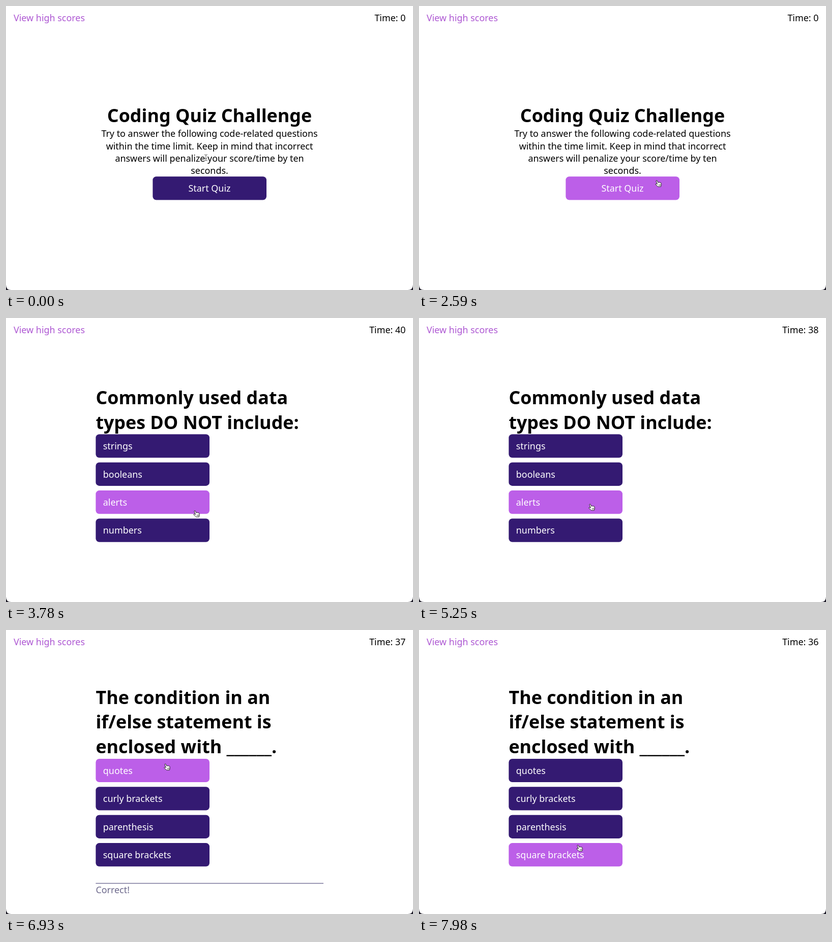
An HTML page for the animation above (8 s loop, 800 px wide and 560 px high).

```html
<!DOCTYPE html>
<html lang="en">
<head>
<meta charset="utf-8">
<title>Coding quiz</title>
<style>
html, body { margin: 0; width: 100%; height: 100%; overflow: hidden; background: #1c1a26; }
svg { display: block; width: 800px; height: 560px; }
text { font: 17.92px "Noto Sans", "Open Sans", sans-serif; white-space: pre; }
.title { font-size: 35.84px; font-weight: 700; }
.mid { text-anchor: middle; }
.end { text-anchor: end; }
.button rect { fill: #341a72; }
.button.hover rect { fill: #bc5fe8; }
.button text { fill: #fff; }
.cursor { stroke-linejoin: round; stroke-linecap: round; }
</style>
</head>
<body>
<svg id="stage" viewBox="0 0 800 560"></svg>
<script>
const LOOP = 8000, START = 3150, ANSWER = 5600, CLEAR = 7400;
const TICKS = [4240, 5240, 6230, 7230];
const PITCH = 55.4, HEIGHT = 46.2;

// Pointer hot spot: time, x, y
const PATH = [
  [0, 393, 299], [690, 393, 299], [1470, 478, 322], [2000, 473, 348], [2590, 467, 344],
  [3150, 462, 349], [3630, 462, 349], [3780, 371, 380], [4410, 336, 367], [5250, 336, 367],
  [6020, 335, 367], [6220, 335, 367], [6370, 329.5, 361.5], [6930, 313, 264],
  [7050, 313, 264], [7840, 312, 416], [7980, 312, 424], [8000, 312, 424]
];

const text = (s, x, y, cls = "", fill = "#000") =>
  `<text x="${x}" y="${y}" class="${cls}" fill="${fill}">${s}</text>`;

const button = (label, x, y, centred) => `<g class="button" data-x="${x}" data-y="${y}">
  <rect x="${x}" y="${y}" width="223.6" height="${HEIGHT}" rx="7"/>
  ${text(label, centred ? 400 : x + 14.4, y + 29.8, centred ? "mid" : "", "#fff")}</g>`;

const question = (lines, top, answers) =>
  lines.map((s, i) => text(s, 176.4, top - 10.6 - 48.9 * (lines.length - 1 - i), "title")).join("") +
  answers.map((s, i) => button(s, 176.4, top + PITCH * i)).join("");

const intro = [
  "Try to answer the following code-related questions",
  "within the time limit. Keep in mind that incorrect",
  "answers will penalize your score/time by ten",
  "seconds."
];

const stage = document.getElementById("stage");
stage.innerHTML = `
  <path d="M0 0H800V550Q800 560 790 560H10Q0 560 0 550Z" fill="#fff"/>
  ${text("View high scores", 15, 30, "", "#ae58d3")}
  <text id="time" class="end" x="785.5" y="30"></text>
  <g class="page">
    ${text("Coding Quiz Challenge", 400, 229.2, "title mid")}
    ${intro.map((s, i) => text(s, 400, 258.4 + 24.15 * i, "mid")).join("")}
    ${button("Start Quiz", 288.4, 336.3, true)}
  </g>
  <g class="page">${question(["Commonly used data", "types DO NOT include:"], 229.3,
    ["strings", "booleans", "alerts", "numbers"])}</g>
  <g class="page">${question(["The condition in an", "if/else statement is", "enclosed with ______."], 253.9,
    ["quotes", "curly brackets", "parenthesis", "square brackets"])}</g>
  <g id="feedback">
    <rect x="176.4" y="498.8" width="447.6" height="1.5" fill="#77739a"/>
    ${text("Correct!", 176.4, 519.4, "", "#6d698c")}
  </g>
  <g id="beam" class="cursor" fill="none" stroke="#555" stroke-width="1">
    <path d="M-2.5-6Q0-6 0-4.5Q0-6 2.5-6M0-4.5V4.5M-2.5 6Q0 6 0 4.5Q0 6 2.5 6M-1.5 1.5H1.5"/>
  </g>
  <g id="arrow" class="cursor">
    <path d="M0 0V10.5L2.5 8.2L4.3 12.2L6.3 11.3L4.6 7.4H8Z" fill="#000" stroke="#fff" stroke-width="1"/>
  </g>
  <g id="hand" class="cursor" stroke="#111" stroke-width=".9">
    <path d="M-1 .8Q-.5-.7 1 .3L2.9 4.2Q4.2 3 5 4.1Q6.3 3.2 7.1 4.3Q8.4 3.8 8.9 5.2L9.3 8.6L8.3 12.2H2.8L-1.8 8.2Q-2.6 6.5-.7 6.5L1.2 7.3Z" fill="#fff"/>
    <path d="M4.3 8.2L4.8 10.4M6 7.9L6.4 10.2M7.6 7.6L7.8 9.8" fill="none" stroke-width=".6"/>
  </g>`;

const get = id => document.getElementById(id);
const show = (el, on) => el.style.display = on ? "" : "none";
const pages = [...document.querySelectorAll(".page")];
const cursors = ["beam", "arrow", "hand"].map(get);

function pointer(t) {
  const i = PATH.findIndex(p => p[0] > t);
  const [t0, x0, y0] = PATH[i - 1], [t1, x1, y1] = PATH[i];
  const u = (t - t0) / (t1 - t0), e = u * u * (3 - 2 * u);
  return [x0 + (x1 - x0) * e, y0 + (y1 - y0) * e];
}

function draw(t) {
  const page = t < START ? 0 : t < ANSWER ? 1 : 2;
  const [x, y] = pointer(t);
  let over = false;
  pages.forEach((p, i) => show(p, i === page));
  for (const b of pages[page].querySelectorAll(".button")) {
    const dx = x - b.dataset.x, dy = y - b.dataset.y;
    const hit = dx > 0 && dx < 223.6 && dy > 0 && dy < HEIGHT;
    b.classList.toggle("hover", hit);
    over = over || hit;
  }
  const kind = over ? 2 : page === 0 && y < 333 ? 0 : 1;
  cursors.forEach((c, i) => {
    show(c, i === kind);
    c.setAttribute("transform", `translate(${x} ${y})`);
  });
  show(get("feedback"), page === 2 && t < CLEAR);
  get("time").textContent = "Time: " + (page ? 40 - TICKS.filter(k => k <= t).length : 0);
}

const begin = performance.now();
function frame() {
  draw((performance.now() - begin) % LOOP);
  requestAnimationFrame(frame);
}
frame();
</script>
</body>
</html>
```
